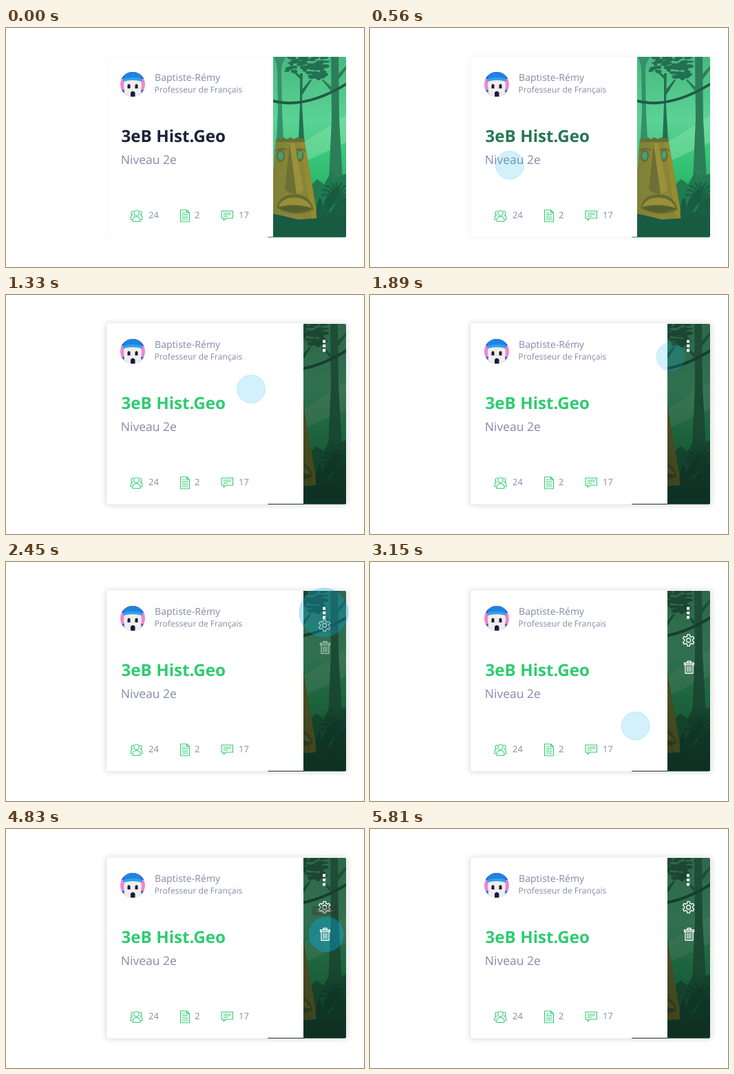
Animation of 520x348 px, one loop 6090 ms. Source, as an HTML page:

```html
<!DOCTYPE html>
<html lang="fr">
<head>
<meta charset="utf-8">
<title>Carte de classe</title>
<style>
html, body { margin: 0; width: 100%; height: 100%; overflow: hidden; background: #fff; }
svg { display: block; width: 520px; height: 348px; }
text { font-family: "Open Sans", "Noto Sans", sans-serif; fill: #858aa8; text-rendering: geometricPrecision; }
.line { fill: none; stroke: #2ecc71; stroke-width: 1.1; stroke-linejoin: round; stroke-linecap: round; }
.thin { stroke-width: .9; }
.white { fill: none; stroke: #fff; stroke-width: 1.3; stroke-linejoin: round; stroke-linecap: round; }
.tip text { font-size: 12px; fill: #fff; text-anchor: middle; }
</style>
</head>
<body>
<svg viewBox="0 0 520 348">
  <defs>
    <linearGradient id="sky" x1="0" y1="0" x2="0" y2="1">
      <stop offset="0" stop-color="#48b880"/>
      <stop offset=".35" stop-color="#5bd394"/>
      <stop offset=".55" stop-color="#42c67f"/>
      <stop offset=".68" stop-color="#2fb46b"/>
      <stop offset="1" stop-color="#1c7a4a"/>
    </linearGradient>
    <linearGradient id="shade" x1="0" y1="0" x2="0" y2="1">
      <stop offset="0" stop-color="#16241a" stop-opacity=".54"/>
      <stop offset=".5" stop-color="#0c2016" stop-opacity=".56"/>
      <stop offset="1" stop-color="#06140f" stop-opacity=".6"/>
    </linearGradient>
    <linearGradient id="wood" x1="0" y1="0" x2="1" y2="0">
      <stop offset="0" stop-color="#7b8038"/>
      <stop offset=".6" stop-color="#8c8737"/>
      <stop offset="1" stop-color="#857f30"/>
    </linearGradient>
    <clipPath id="photo"><path d="M380 42H492q2 0 2 2V302.500q0 2-2 2H380z"/></clipPath>
    <clipPath id="face"><circle cx="184" cy="82" r="18"/></clipPath>
    <filter id="blur" x="-10%" y="-10%" width="120%" height="120%"><feGaussianBlur stdDeviation="4"/></filter>
  </defs>

  <rect id="shadow" x="145" y="41" width="351" height="265" rx="3" fill="#000" filter="url(#blur)"/>
  <rect x="146.5" y="41.5" width="348" height="263" rx="2.5" fill="#fff" stroke="#f8f8f9"/>

  <g clip-path="url(#photo)">
    <g id="scene">
      <rect x="380" y="42" width="120" height="263" fill="url(#sky)"/>
      <path d="M500 124L388 194V216L500 164z" fill="#9aeab4" opacity=".34"/>
      <path d="M500 164L430 197V222H500z" fill="#2fc26f" opacity=".4"/>
      <g fill="#34906a">
        <path d="M389 42h18q-7 8-7 20l1 58 2 42h-10l2-42-1-60q-1-10-5-18z"/>
        <path d="M472 42h11l1 90 5 90h-20l4-90z" fill="#2c7e59"/>
        <path d="M472 92l-13-16 1-2 13 12zM482 68l13-14v5l-12 16z" fill="#2c7e59"/>
        <path d="M427 66h4l-1 45 3 51h-8l2-51zM428 92l14-17 2 1-14 22zM427 74l-12-12 1-2 12 10z" fill="#256f51"/>
      </g>
      <g id="leaves" fill="#246f50"></g>
      <path d="M380 104Q432 122 500 78" fill="none" stroke="#1f5c47" stroke-width="4"/>
      <path d="M440 304V232l12-12 10 8 10-18 8 8 14-6 6-4V304z" fill="#217a50"/>
      <g id="fern" fill="none" stroke="#1a6245" stroke-width="3"></g>
      <path d="M392 162l41-1 20 116-30 2-40-8z" fill="url(#wood)"/>
      <path d="M427 163l6-2 20 116-9 1z" fill="#9c8f30" opacity=".7"/>
      <path d="M392 166l2-7 5 3 4-3 5 3 5-3 5 3 5-3 5 3 5-2 1 6z" fill="#656f36"/>
      <path d="M391 179q9-6 17-1M419 179q7-6 16 0" fill="none" stroke="#616a33" stroke-width="2"/>
      <ellipse cx="399" cy="186" rx="6" ry="9" fill="#616d38"/>
      <ellipse cx="427" cy="186" rx="5.500" ry="9" fill="#616d38"/>
      <ellipse cx="399" cy="186" rx="4" ry="6" fill="#46a073"/>
      <ellipse cx="427" cy="185" rx="3.500" ry="6" fill="#46a073"/>
      <path d="M412 168h7l13 68-10 6-13-4z" fill="#9b913b"/>
      <path d="M412 168l-7 66 4 5 13 3z" fill="#6c7034"/>
      <path d="M393 262q4-20 26-20t28 22q-26 14-54-2z" fill="#666b33"/>
      <path d="M396 260q5-13 23-13t25 15q-24-8-48-2z" fill="#989039"/>
      <path d="M396 262q24-7 48 1-24 10-48-1z" fill="#55602f"/>
      <path d="M456 276q6-36 28-46-2 30-28 46zM466 284q10-34 34-40v24zM452 280q-4-20 4-34 8 16-4 34z" fill="#175c42"/>
      <path d="M448 282l14-22 12 12 12-20 14 10V290z" fill="#1a5f44"/>
      <path d="M380 269l20 4 24 6 30-2 20-7 26 6V306H380z" fill="#195a42"/>
    </g>
    <rect id="dark" x="380" y="42" width="114" height="263" fill="url(#shade)"/>
  </g>

  <rect id="panel" x="147" y="42" height="262" fill="#fff"/>
  <rect id="edge" x="381" y="304" height="1" fill="#1c3a2c"/>

  <g clip-path="url(#face)">
    <rect x="166" y="64" width="36" height="36" fill="#ee86d2"/>
    <path d="M166 64h36v10h-36z" fill="#2550c0"/>
    <path d="M166 90h8l2 10h-10zM194 90h8v10h-10z" fill="#2f6fe0"/>
    <path d="M172 77q12-3 24 0l1 6-1 9 2 8h-28l2-8-1-9z" fill="#f1eee6"/>
    <path d="M170 77q0-13 14-13t14 13q-14-3-28 0z" fill="#1f83e3"/>
    <path d="M170 74q14-4 28 0v4q-14-4-28 0z" fill="#2fa2ee"/>
    <path d="M176.500 83q2-3 4 0v5h-4zM187.500 83q2-3 4 0v5h-4zM181 101v-7q3-4 6.500 0v7z" fill="#141a4c"/>
  </g>
  <text x="216" y="77" font-size="14.1">Baptiste-Rémy</text>
  <text x="215.500" y="94" font-size="12.1">Professeur de Français</text>
  <text id="title" x="167.500" y="166" font-size="24.2" font-weight="700">3eB Hist.Geo</text>
  <text x="166.800" y="197.500" font-size="17.5">Niveau 2e</text>

  <g class="line">
    <circle cx="189.500" cy="269.500" r="3.700"/>
    <path d="M184 281.500q-.5-7 5.500-7t5.500 7z"/>
    <path d="M185.500 267q-3.500-1-3.500 2.500 0 2 1.500 3-2.500 1-2.500 6.500h2.500M193.500 267q3.500-1 3.500 2.500 0 2-1.500 3 2.500 1 2.500 6.500h-2.500"/>
    <path d="M253.500 265h9l4 4V282h-13zM262.500 265v4h4"/>
    <path d="M313 266.500h16.500v10.500h-10l-3.500 3v-3h-3z"/>
    <path class="thin" d="M256 269h4M256 271.500h8M256 274h8M256 276.500h8M256 279h8M316 269.500h10.500M316 271.800h10.500M316 274.200h6"/>
  </g>
  <g font-size="13">
    <text x="207" y="277">24</text>
    <text x="274" y="277">2</text>
    <text x="338" y="277">17</text>
  </g>

  <circle id="cursor" fill="#08afec" stroke="#08a0dc"/>
  <g id="dots" fill="#fff">
    <rect x="460" y="65.500" width="4.200" height="4.200"/>
    <rect x="460" y="72" width="4.200" height="4.200"/>
    <rect x="460" y="78.500" width="4.200" height="4.200"/>
  </g>
  <g id="gear" class="white"><path id="cog"/><circle r="3"/></g>
  <g id="bin" class="white">
    <path d="M-7-6.500H7V-4H-7zM-2.500-6.500V-9h5v2.500M-5.500-4V8.500h11V-4M-2.500-1.500V6M0-1.500V6M2.500-1.500V6"/>
  </g>
  <g id="tipEdit" class="tip"><rect x="-42" y="-17" width="84" height="34" rx="2" fill="#333" opacity=".92"/><text y="4.500">Modifier</text></g>
  <g id="tipDelete" class="tip"><rect x="-46" y="-17" width="92" height="34" rx="2" fill="#333" opacity=".92"/><text y="4.500">Supprimer</text></g>
</svg>
<script>
const LOOP = 6090, STEP = 70;
const $ = id => document.getElementById(id);
const set = (id, attrs) => { for (const k in attrs) $(id).setAttribute(k, attrs[k]); };
const ramp = (t, a, b) => Math.min(1, Math.max(0, (t - a) / (b - a)));
const easeOut = u => 1 - Math.pow(1 - u, 1.5);
const mix = (a, b, u) => a + (b - a) * u;

// Each move: [time, x, y] stops, then click time, length and final radius.
const moves = [
  { path: [[210, 126, 231], [770, 249, 181], [1330, 356, 137], [1400, 366, 132], [2030, 457, 78], [2100, 461.5, 73.5]], click: 2240, span: 340, reach: 45 },
  { path: [[3010, 363, 276], [3570, 454, 127], [3710, 455, 118]], click: 3740, span: 250, reach: 50 },
  { path: [[4270, 455, 118], [4760, 465, 153.5]], click: 4780, span: 260, reach: 45 }
];

function along(path, t) {
  let i = 1;
  while (i < path.length - 1 && t > path[i][0]) i++;
  const a = path[i - 1], b = path[i], u = ramp(t, a[0], b[0]);
  return [mix(a[1], b[1], u), mix(a[2], b[2], u)];
}

function drawCursor(t) {
  const m = moves.find(m => t >= m.path[0][0] && t < m.click + m.span);
  if (!m) return set("cursor", { opacity: 0 });
  const [cx, cy] = along(m.path, t);
  const u = ramp(t, m.click, m.click + m.span);
  const alpha = u > 0 ? 0.37 * (1 - u ** 3) : 0.18 * ramp(t, m.path[0][0] - STEP, m.path[0][0] + STEP);
  set("cursor", { cx, cy, r: mix(21, m.reach, u) - 0.5, opacity: 1, "fill-opacity": alpha, "stroke-opacity": alpha });
}

function drawTip(id, y, t, show, hide) {
  const s = ramp(t, show, show + 350) * (1 - ramp(t, hide, hide + 350));
  set(id, { transform: `translate(463 ${y}) scale(${s})`, opacity: s });
}

function drawIcon(id, x, y, rise, t) {
  const u = ramp(t, 2310, 2730);
  set(id, { transform: `translate(${x} ${y - rise * (1 - easeOut(u))})`, opacity: Math.min(1, u * 1.8) });
}

function draw(t) {
  const u = ramp(t, 560, 980), open = easeOut(u), right = Math.round(mix(388, 432, open));
  set("panel", { width: right - 147 });
  set("edge", { width: right - 381, opacity: open });
  set("shadow", { opacity: 0.15 * ramp(t, 490, 770) });
  set("dark", { opacity: open });
  set("scene", { transform: `translate(${-open} 0)` });
  set("dots", { opacity: u });
  const g = ramp(t, 420, 700);
  $("title").style.fill = `rgb(${mix(27, 46, g)},${mix(34, 204, g)},${mix(54, 113, g)})`;
  drawCursor(t);
  drawIcon("gear", 462.7, 114, 40, t);
  drawIcon("bin", 463.5, 153.5, 53, t);
  drawTip("tipEdit", 80, t, 3640, 4270);
  drawTip("tipDelete", 119, t, 4690, 5460);
}

function build() {
  let seed = 7;
  const rnd = () => (seed = seed * 16807 % 2147483647) / 2147483647;
  let leaves = "";
  for (let i = 0; i < 75; i++) {
    const x = 408 + rnd() * 57, y = 42 + rnd() * (x > 432 ? 32 : 22);
    leaves += `<ellipse cx="${x}" cy="${y}" rx="${2.5 + rnd() * 4}" ry="${1.3 + rnd() * 1.7}"/>`;
  }
  $("leaves").innerHTML = leaves;

  let fern = "";
  for (let i = 0; i < 9; i++) {
    const a = Math.PI * (1 + i / 8), x = 480 + 22 * Math.cos(a), y = 244 + 18 * Math.sin(a);
    fern += `<path d="M480 258Q${480 + 10 * Math.cos(a)} ${y - 6} ${x} ${y}"/>`;
  }
  $("fern").innerHTML = fern;

  const pts = [];
  for (let i = 0; i < 6; i++)
    for (const [off, r] of [[-0.32, 6.2], [-0.2, 8.6], [0.2, 8.6], [0.32, 6.2]]) {
      const a = i * Math.PI / 3 + Math.PI / 6 + off;
      pts.push(`${r * Math.cos(a)} ${r * Math.sin(a)}`);
    }
  set("cog", { d: `M${pts.join("L")}z` });
}

build();
const start = performance.now();
function tick() {
  const t = (performance.now() - start) % LOOP;
  draw(Math.floor(t / STEP) * STEP);
  requestAnimationFrame(tick);
}
tick();
</script>
</body>
</html>
```
